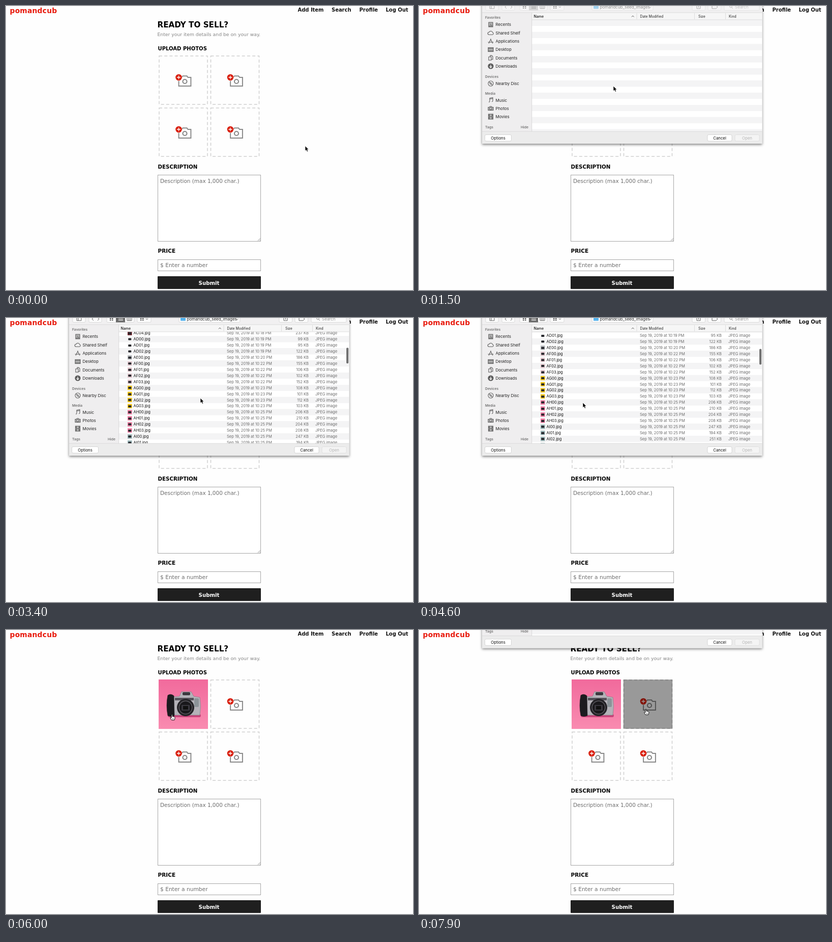
An HTML page that plays this animation: 800 by 557 pixels, repeating every 8000 ms.

```html
<!DOCTYPE html>
<html lang="en">
<head>
<meta charset="utf-8">
<title>Ready to sell?</title>
<style>
  html, body { margin: 0; width: 100%; height: 100%; overflow: hidden; background: #fefefe; }
  svg { display: block; }
  text { white-space: pre; }
  .wide { font-family: "DejaVu Sans", sans-serif; }
  .ui { font-family: Inter, "Liberation Sans", sans-serif; }
  .b { font-weight: 700; }
  .m { font-weight: 500; }
  .end { text-anchor: end; }
  .mid { text-anchor: middle; }
</style>
</head>
<body>
<svg id="stage" width="800" height="557" viewBox="0 0 800 557"></svg>
<script>
const LOOP = 8000, STEP = 100, ROW = 11.93, LIST_TOP = 27, SLIDE = 278;
const BOXES = [[301, 98], [402.5, 98], [301, 200], [402.5, 200]];
const SELECTED = 34;

const text = (x, y, size, str, cls = '', fill = '#111', extra = '') =>
  `<text x="${x}" y="${y}" font-size="${size}" class="${cls}" fill="${fill}" ${extra}>${str}</text>`;
const rect = (x, y, w, h, fill, extra = '') =>
  `<rect x="${x}" y="${y}" width="${w}" height="${h}" fill="${fill}" ${extra}/>`;
const circle = (x, y, r, fill, extra = '') =>
  `<circle cx="${x}" cy="${y}" r="${r}" fill="${fill}" ${extra}/>`;
const path = (d, stroke = '#777', width = 1, fill = 'none') =>
  `<path d="${d}" fill="${fill}" stroke="${stroke}" stroke-width="${width}"/>`;
const group = (id, body, extra = '') => `<g id="${id}" ${extra}>${body}</g>`;

// ---- page ----
const uploadBox = ([x, y]) => `<g transform="translate(${x} ${y})">
  ${rect(0, 0, 95, 95, 'none', 'stroke="#cfcfcf" stroke-width="1.5" stroke-dasharray="6 4.2"')}
  ${path('M38.6 46V59H62.4V42H56.6L54.6 39.3H46.6L44 42', '#8a8a8a', 2)}
  ${circle(50.5, 50, 4, 'none', 'stroke="#8a8a8a" stroke-width="2.2"')}
  ${circle(38.5, 42, 6.9, '#fefefe')}${circle(38.5, 42, 6.3, '#d9200f')}
  ${path('M35 42H42M38.5 38.5V45.5', '#fff', 1.3)}</g>`;

const photo = rect(300, 97, 97, 97, 'url(#pink)') +
  rect(318, 165, 65, 6, '#c9447a', 'rx="3"') +
  path('M327 131L341 130L345 121H364L369 130L381 132Q384 150 381 167H326Z', '#77757b', .6, '#b4b2b8') +
  path('M318 128Q324 124 330 129L331 168Q324 171 318 168Q314 148 318 128Z', '#111', .5, '#1c1b1f') +
  rect(347, 122, 15, 6, '#3b393f', 'rx="2"') + rect(370, 134, 9, 17, '#8b9398', 'rx="2"') +
  rect(332, 133, 37, 5, '#55525a') + circle(353, 152, 17, '#242327') +
  circle(353, 152, 13.5, '#59575d') + circle(353, 152, 12, '#19181b') +
  rect(345, 147, 16, 11, '#39373e', 'rx="1"') + rect(348, 149, 10, 7, '#111');

const field = (y, h) => rect(298.5, y, 202, h, '#fff', 'stroke="#a6a6a6"');

const page = group('page',
  text(7.5, 13.5, 13.8, 'pomandcub', 'b', '#e8190c', 'letter-spacing=".25"') +
  [[573.5, 'Add Item'], [640, 'Search'], [694.5, 'Profile'], [746.5, 'Log Out']]
    .map(([x, s]) => text(x, 11.3, 9.95, s, 'b')).join('') +
  text(297.5, 41.5, 15.2, 'READY TO SELL?', 'b', '#000') +
  text(297.5, 59, 9.26, 'Enter your item details and be on your way.', '', '#858585') +
  [[87.3, 10.05, 'UPLOAD PHOTOS'], [318.8, 10.25, 'DESCRIPTION'], [484.4, 10.5, 'PRICE']]
    .map(([y, size, s]) => text(298.5, y, size, s, 'b', '#000')).join('') +
  BOXES.map(uploadBox).join('') + group('photo', photo) +
  rect(0, 0, 96.5, 96.5, '#000', 'id="shade" opacity=".4"') +
  field(331.5, 130) + path('M495 460.5L500 455.5M498 460.5L500 458.5', '#777', .8) +
  text(303, 346.5, 10.45, 'Description (max 1,000 char.)', '', '#6c6c6c') +
  field(497.5, 22) + text(303, 512.3, 10.65, '$ Enter a number', '', '#6c6c6c') +
  rect(298, 530, 203, 25, '#1f1f1f', 'rx="1"') +
  text(399, 546.5, 10.2, 'Submit', 'b mid', '#fff'), 'class="wide"');

// ---- file list: name, size in KB, minute after ten ----
const FILES = (`A000 312 12,A001 284 12,A002 305 12,A003 261 12,A004 338 13,A005 297 13,A006 274 13,A007 319 13,A008 341 14,
A009 326 14,AA00 358 14,AA01 403 15,AA02 266 15,AA03 297 15,AB00 350 16,AB01 463 17,AB02 306 17,AB03 202 17,
AC00 247 17,AC01 244 17,AC02 245 18,AC04 237 18,AD00 99 19,AD01 95 19,AD02 122 19,AE00 186 20,
AF00 155 22,AF01 106 22,AF02 102 22,AF03 152 22,AG00 108 23,AG01 101 23,AG02 112 23,AG03 103 23,
AH00 206 25,AH01 210 25,AH02 204 25,AH03 208 25,AI00 247 25,AI01 194 25,AI02 251 25,AI03 267 25`)
  .split(',').map(s => s.trim().split(' '));
const TINTS = { 0: '#aab4bd', A: '#a3a6ab', B: '#c9ccd0', C: '#6a2029', D: '#f4f4f4', E: '#b5b8bb',
  F: '#e3c9cf', G: '#f0c414', H: '#ee7ba2', I: '#9db8ba' };

const rowTop = i => LIST_TOP + i * ROW;
const fileRow = ([name, kb, minute], i) => {
  const y = rowTop(i), base = y + 8.7, on = i === SELECTED;
  return `<g ${on ? 'id="picked"' : ''} fill="#6c6c6c">` +
    rect(239, y + 1.8, 8.6, 8.4, TINTS[name[1]]) +
    rect(240.3, y + 4 + i % 2 * .5, 6, 4, '#25262b', 'rx="1"') +
    `<text x="250.5" y="${base}" fill="#111" class="name">${name}.jpg</text>
     <text x="434" y="${base}">Sep 19, 2019 at 10:${minute} PM</text>
     <text x="595" y="${base}" class="end">${kb} KB</text>
     <text x="608" y="${base}">JPEG image</text></g>`;
};
const stripes = Array.from({ length: 62 }, (_, i) =>
  rect(222, rowTop(i), 452.5, ROW, i % 2 ? '#fff' : '#f4f4f5')).join('');

// ---- dialog ----
const SIDEBAR = [
  [36.5, 'Recents', 'M-4-4.5H4V4.5H-4ZM0-2V1H2.5M-4 3H4'],
  [52.7, 'Shared Shelf', 'M-3.5 3.5H3.5A2.3 2.3 0 0 0 3.5-1A3.5 3.5 0 0 0-3-1.5A2.5 2.5 0 0 0-3.5 3.5Z'],
  [69, 'Applications', 'M-4 4.5L.5-4.5M-.5-4.5L4 4.5M-5.5 2H5.5'],
  [85.5, 'Desktop', 'M-5-4H5V4H-5ZM-5-2H5M-5 2.2H5'],
  [101.8, 'Documents', 'M-4-2H1V4.5H-4ZM-1-2V-4.7H2L4-2.5V3H1'],
  [118, 'Downloads', ''],
  [152, 'Nearby Disc', 'M-5 0A5 5 0 1 0 5 0A5 5 0 1 0-5 0M-1.5 0A1.5 1.5 0 1 0 1.5 0A1.5 1.5 0 1 0-1.5 0M-3-3L-1-1M1 1L3 3'],
  [184.7, 'Music', 'M-2 3V-4L4-5V2M-2-2.2L4-3.2M-4 3.5H-2M2 2.5H4'],
  [201, 'Photos', 'M-5-2.5H-2.5L-1.5-4H1.5L2.5-2.5H5V3.5H-5ZM-2 .5A2 2 0 1 0 2 .5A2 2 0 1 0-2 .5'],
  [217, 'Movies', 'M-4.5-5H4.5V5H-4.5ZM-2.5-5V5M2.5-5V5M-2.5 0H2.5M-4.5-2.5H-2.5M-4.5 2.5H-2.5M2.5-2.5H4.5M2.5 2.5H4.5']
];
// Solid icons get a light grey body under their outline.
const SOLID = ['Recents', 'Desktop', 'Photos', 'Movies'];
const sidebarItem = ([y, label, d]) =>
  `<g transform="translate(141 ${y})">` +
  (d ? path(d, '#5c5c5c', 1.1, SOLID.includes(label) ? '#b4b4b4' : 'none')
    : circle(0, 0, 5.6, '#5c5c5c') + path('M0-3V2.5M-2.3.5L0 3L2.3.5', '#fff', 1.2)) +
  `</g>` + text(150.5, y + 2.9, 8, label, '', '#222');

const tool = (x, w) => rect(x, -8, w, 16.5, '#fbfbfb', 'rx="2" stroke="#d0d0d0" stroke-width=".7"');
const toolbar = group('toolbar',
  tool(131, 25) + tool(163, 25) + tool(198, 54) + tool(258, 27) +
  tool(340, 120) + tool(537, 25.5) + tool(568, 25.5) + tool(600, 69) +
  rect(216, -8, 18, 16.5, '#6b6b6b', 'id="view"') +
  group('viewLines', path('M221-.5H230M221 2H230M221 4.5H230', 'inherit', 1), 'stroke="#fff"') +
  path('M139-1H148V5H139ZM142-1V5M172-1L169 2L172 5M180-1L183 2L180 5' +
    'M238-1H247V5H238ZM241-1V5M244-1V5M275 1L277 3L279 1M452 2L454 4L456 2M452 .5L454-1.5L456 .5' +
    'M546 0V5H553V0M549.5 3V-3M576-1H584L587 2L584 5H576Z', '#555', .9) +
  [[204, 0], [208, 0], [204, 3], [208, 3], [264, 0], [268, 0], [264, 3], [268, 3]]
    .map(([x, y]) => rect(x, y, 2.5, 2, '#555')).join('') +
  rect(343, -2, 10, 7.5, '#56b4ef', 'rx="1"') +
  text(355.5, 4.7, 8, 'pomandcub_seed_images', '', '#333') +
  circle(613, 1, 2.2, 'none', 'stroke="#777" stroke-width=".8"') + path('M614.5 2.7L617 5', '#777', .9) +
  text(621, 4.7, 8, 'Search', '', '#999'));

const button = (x, w, label, fill = '#fff', color = '#111', line = '#c9c9c9') =>
  rect(x, 252.4, w, 12.6, fill, `rx="2.5" stroke="${line}" stroke-width=".7"`) +
  text(x + w / 2, 261.5, 7.8, label, 'mid', color);
const sectionTitle = (y, s) => text(130, y, 6.8, s, '', '#707070', 'font-weight="600"');

const dialog = group('dialog',
  rect(124, -20, 550.5, 290, '#ececec', 'filter="url(#shadow)"') +
  rect(124, -20, 550.5, 33, '#f1f0f1') + toolbar +
  rect(124, 13, 97.5, 233, '#efeeef') +
  sectionTitle(25, 'Favorites') + sectionTitle(140.6, 'Devices') + sectionTitle(173.8, 'Media') +
  sectionTitle(239.5, 'Tags') + text(215, 239.5, 6.8, 'Hide', 'm end', '#666') +
  SIDEBAR.map(sidebarItem).join('') +
  `<g clip-path="url(#listClip)"><g id="list">${stripes}` +
  rect(222, rowTop(SELECTED), 452.5, ROW, '#1663d8', 'id="highlight"') +
  group('files', FILES.map(fileRow).join(''), 'font-size="7.55"') + `</g>` +
  rect(669, 0, 4.2, 31, '#717171', 'id="thumb" rx="2.1"') + `</g>` +
  rect(222, 13, 452.5, 14, '#f6f6f6') +
  path('M124 13H674.5M222 27H674.5M221.7 13V246M428 14V26M541.5 14V26M602.5 14V26M124 246H674.5', '#d2d2d2', .7) +
  text(225.5, 22.6, 7, 'Name', 'm') + path('M418 21.5L420.3 19L422.6 21.5', '#444', .9) +
  [[434.5, 'Date Modified'], [549, 'Size'], [609, 'Kind']].map(([x, s]) => text(x, 22.6, 6.9, s, '', '#222')).join('') +
  button(129.5, 52, 'Options') + button(567, 48, 'Cancel') +
  group('openOff', button(621, 48, 'Open', '#f4f4f4', '#b4b4b4', '#dadada')) +
  group('openOn', button(621, 48, 'Open', 'url(#blue)', '#fff', '#1768d8')), 'class="ui"');

// ---- cursors, tip at the origin ----
const cursors =
  group('arrow', path('M0 0V9.8L2.2 7.8L3.8 11.3L5.6 10.5L4.1 7.1H7Z', '#fff', .7, '#000')) +
  group('hand', path('M-1 .8Q0-.4 1 .8V4L5.4 5.1Q6.2 5.6 5.9 7.2L4.8 11.2H-.6L-3.2 7.4Q-3.6 5.8-2.3 6.1L-1 7Z', '#000', .9, '#fff') +
    path('M1.2 7.5V9.5M3 7.5V9.5', '#000', .6));

const $ = id => document.getElementById(id);
$('stage').innerHTML = `<defs>
  <linearGradient id="pink" x2="0" y2="1"><stop stop-color="#f16a9c"/><stop offset="1" stop-color="#f98bb0"/></linearGradient>
  <linearGradient id="blue" x2="0" y2="1"><stop stop-color="#4c9cf9"/><stop offset="1" stop-color="#0a63ee"/></linearGradient>
  <clipPath id="listClip"><rect x="222" y="27" width="452.5" height="219"/></clipPath>
  <filter id="shadow" x="-5%" y="-5%" width="110%" height="115%">
    <feDropShadow dx="0" dy="2" stdDeviation="2.5" flood-opacity=".5"/></filter>
</defs>` + page + dialog + cursors;

// ---- motion ----
const CURSOR = [[0, 588, 274.5], [100, 588, 274.5], [600, 382, 157], [3700, 382, 157], [4500, 322, 166],
  [5900, 322, 166], [6700, 420, 153], [7300, 420, 153], [7600, 446, 155], [8000, 446, 155]];
const SCROLL = [[0, 0], [1800, 0], [2700, 121.8], [3600, 273], [8000, 273]];

const ease = (t, from, to) => {
  const k = Math.min(1, Math.max(0, (t - from) / (to - from)));
  return k * k * (3 - 2 * k);
};
const along = (keys, t) => {
  const i = keys.findIndex(key => key[0] > t), a = keys[i - 1], b = keys[i], k = ease(t, a[0], b[0]);
  return a.slice(1).map((v, n) => v + (b[n + 1] - v) * k);
};
const show = (id, on) => $(id).setAttribute('display', on ? 'inline' : 'none');
const move = (id, x, y) => $(id).setAttribute('transform', `translate(${x} ${y})`);

function draw(t) {
  const [x, y] = along(CURSOR, t), [scroll] = along(SCROLL, t);
  const drop = ease(t, 970, 1490) - ease(t, 4900, 5190) + ease(t, 7770, 8290);
  const offset = (drop - 1) * SLIDE;
  const loaded = t >= 1700 && t < 7000, picked = t >= 4700 && t < 7000, uploaded = t >= 5500;

  const reachable = (t < 3000 || t >= 5900) && 270 + offset < y;
  const hovered = reachable ? BOXES.findIndex(([bx, by]) => x >= bx && x <= bx + 95 && y >= by && y <= by + 95) : -1;

  show('photo', uploaded);
  show('shade', hovered >= 0 && !(uploaded && hovered === 0));
  if (hovered >= 0) move('shade', BOXES[hovered][0] - .75, BOXES[hovered][1] - .75);

  show('dialog', drop > 0);
  move('dialog', 0, offset);
  move('list', 0, -scroll);
  move('thumb', 0, 28 + scroll / 8.4);
  show('files', loaded);
  show('thumb', loaded && t >= 1900);
  show('highlight', picked);
  $('picked').setAttribute('fill', picked ? '#fff' : '#6c6c6c');
  $('picked').querySelector('.name').setAttribute('fill', picked ? '#fff' : '#111');
  show('openOn', picked);
  show('openOff', !picked);
  $('toolbar').setAttribute('opacity', loaded ? 1 : .5);
  $('view').setAttribute('fill', loaded ? '#6b6b6b' : '#bbb');
  $('viewLines').firstChild.setAttribute('stroke', loaded ? '#fff' : '#555');

  show('arrow', hovered < 0);
  show('hand', hovered >= 0);
  move(hovered < 0 ? 'arrow' : 'hand', x, y);
}

function tick() {
  draw(Math.floor(performance.now() % LOOP / STEP) * STEP);
  requestAnimationFrame(tick);
}
tick();
</script>
</body>
</html>
```
